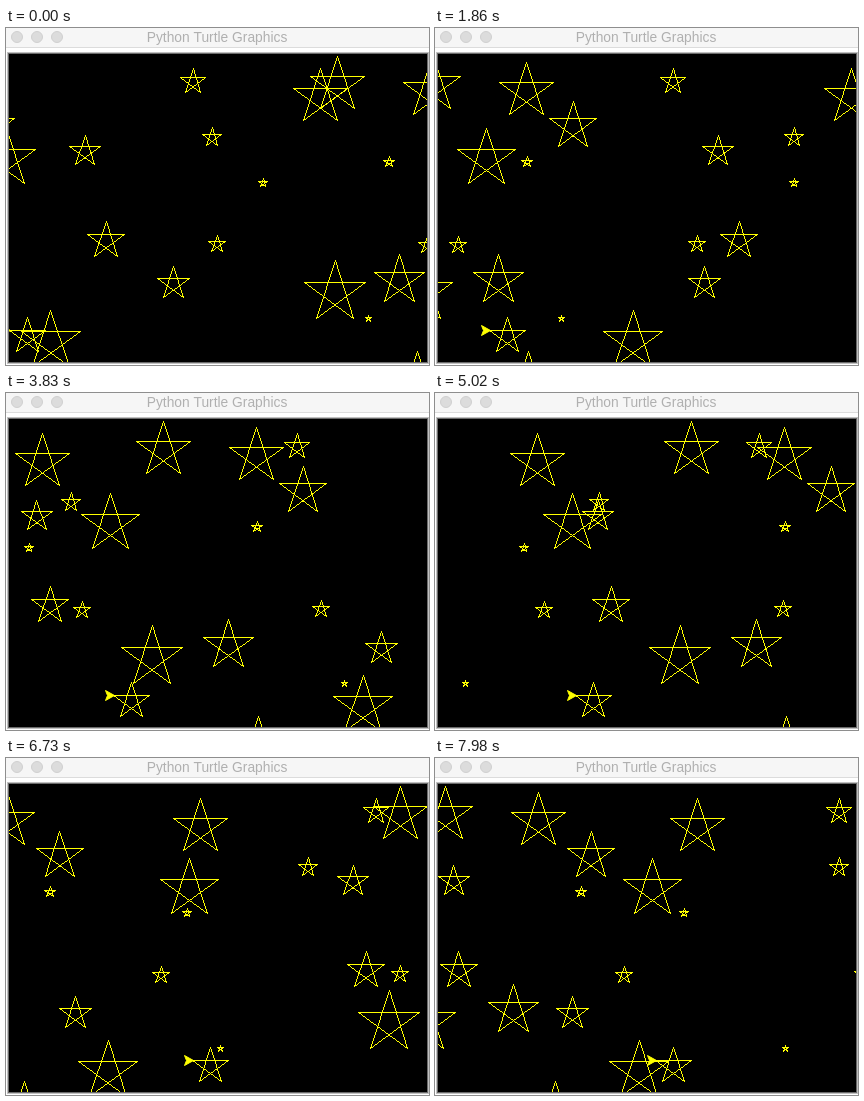
Animation, 423 px wide and 337 px high, one loop 8 s. Source, as an HTML page with a canvas:

```html
<!DOCTYPE html>
<html>
<head>
<meta charset="utf-8">
<title>Python Turtle Graphics</title>
<style>
  html, body { margin: 0; width: 100%; height: 100%; overflow: hidden; background: #fff; }
  canvas { display: block; }
</style>
</head>
<body>
<canvas width="423" height="337"></canvas>
<script>
const ctx = document.querySelector('canvas').getContext('2d');
const LOOP_MS = 8000;
const STEP_MS = 36.75;
const FIELD_WIDTH = 432;
const TURN = 144 * Math.PI / 180;
const YELLOW = '#ffff00';

const star = (x, y, size) => ({ x, y, size });

// Each layer drifts right at its own speed; a star is placed by its left tip.
const layers = [
  { speed: 4, stars: [star(63, 118, 31), star(81, 206, 37), star(359, 289, 6)] },
  { speed: 3, stars: [
    star(304, 48, 54), star(397, 54, 54), star(-39, 90, 47),
    star(196, 106, 19), star(377, 132, 11), star(368, 244, 50),
    star(298, 254, 61), star(15, 303, 59), star(392, 337, 38),
  ] },
  { speed: 2, stars: [star(287, 60, 54), star(252, 153, 9), star(151, 250, 32)] },
  { speed: 1, stars: [
    star(174, 49, 25), star(-29, 121, 58), star(202, 213, 17),
    star(412, 214, 17), star(3, 302, 36),
  ] },
];

function rect(color, x, y, w, h) {
  ctx.fillStyle = color;
  ctx.fillRect(x, y, w, h);
}

// Unsmoothed one-pixel line
function line(x1, y1, x2, y2) {
  const steps = Math.max(Math.abs(x2 - x1), Math.abs(y2 - y1), 1);
  for (let i = 0; i <= steps; i++) {
    const k = i / steps;
    ctx.fillRect(Math.round(x1 + (x2 - x1) * k), Math.round(y1 + (y2 - y1) * k), 1, 1);
  }
}

// A star re-enters on the left once it has fully left on the right.
function leftTip({ x, size }, speed, step) {
  const period = speed * Math.ceil((FIELD_WIDTH + size) / speed);
  return (x + size + speed * step) % period - size;
}

// Five times: forward, then right by 144 degrees
function drawStar(x, y, size) {
  for (let i = 0; i < 5; i++) {
    const nextX = x + size * Math.cos(i * TURN);
    const nextY = y + size * Math.sin(i * TURN);
    line(...[x, y, nextX, nextY].map(Math.round));
    [x, y] = [nextX, nextY];
  }
}

function drawTurtle(x, y) {
  ctx.beginPath();
  for (const [dx, dy] of [[0, 0], [-9, 5], [-7, 0], [-9, -5]]) ctx.lineTo(x + dx + 1.5, y + dy + 0.5);
  ctx.closePath();
  ctx.fillStyle = ctx.strokeStyle = YELLOW;
  ctx.fill();
  ctx.stroke();
}

function drawWindow() {
  rect('#ffffff', 0, 0, 423, 337);
  rect('#f6f6f6', 0, 0, 423, 19);
  rect('#dcdcdc', 0, 19, 423, 1);
  for (const x of [11, 31, 51]) {
    ctx.beginPath();
    ctx.arc(x, 9, 5.5, 0, 2 * Math.PI);
    ctx.fillStyle = '#dcdcdc';
    ctx.fill();
    ctx.strokeStyle = '#d0d0d0';
    ctx.stroke();
  }
  ctx.font = '13.8px "Liberation Sans", Arial, sans-serif';
  ctx.textAlign = 'center';
  ctx.fillStyle = '#b0b0b0';
  ctx.fillText('Python Turtle Graphics', 211, 14);
  rect('#c0c0c0', 1, 24, 422, 312);
  rect('#6b6b6b', 2, 25, 420, 310);
  rect('#000000', 3, 26, 418, 308);
}

function draw() {
  const step = Math.floor(performance.now() % LOOP_MS / STEP_MS + 0.5);
  drawWindow();
  ctx.save();
  ctx.beginPath();
  ctx.rect(3, 26, 418, 308);
  ctx.clip();
  ctx.fillStyle = YELLOW;
  let x, y;
  for (const { speed, stars } of layers) {
    for (const s of stars) {
      [x, y] = [leftTip(s, speed, step), s.y];
      drawStar(x, y, s.size);
    }
  }
  drawTurtle(x, y); // it rests on the star drawn last
  ctx.restore();
  requestAnimationFrame(draw);
}
draw();
</script>
</body>
</html>
```
